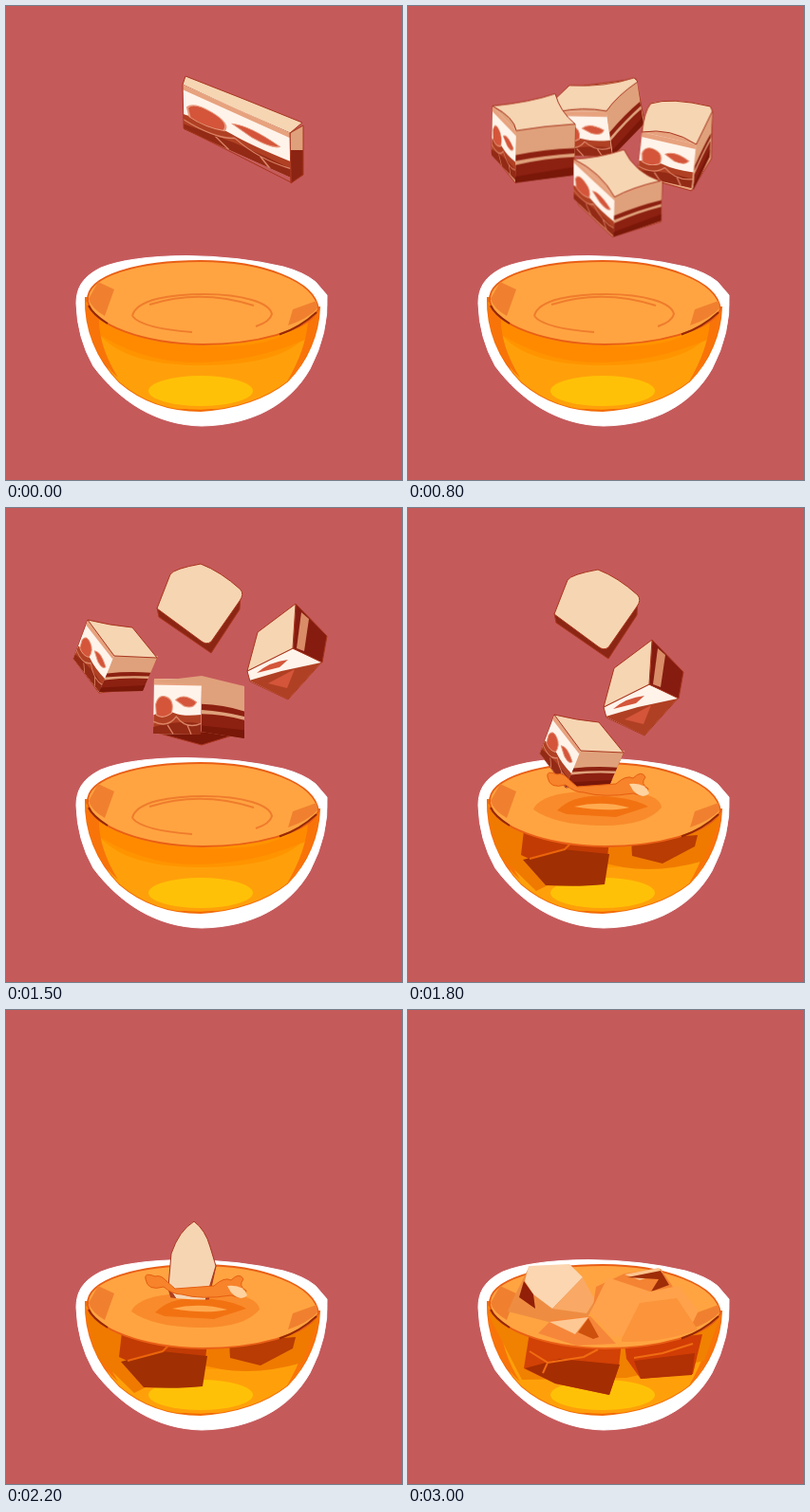
An HTML page without scripts for the animation above (3100 ms loop, 417x500 px).

```html
<!DOCTYPE html>
<html lang="en">
<head>
<meta charset="utf-8">
<title>Pork cubes and broth</title>
<style>
html, body { margin: 0; width: 100%; height: 100%; overflow: hidden; background: #c55a5b }
svg { display: block; width: 100%; height: 100% }

/* One 3.1 s loop, held in 100 ms poses */
[class] { animation: 3.1s step-end infinite }
.slab { animation-name: slab }
.block { animation-name: block }
.grow-top { animation-name: grow-top }
.grow-side { animation-name: grow-side }
.half-l { animation-name: half-l }
.half-r { animation-name: half-r }
.cut-a { animation-name: cut-a }
.cut-b { animation-name: cut-b }
.cut-c { animation-name: cut-c }
.cut-d { animation-name: cut-d }
.toss-e { animation-name: toss-e }
.toss-f { animation-name: toss-f }
.toss-g { animation-name: toss-g }
.toss-h { animation-name: toss-h }
.dive-j { animation-name: dive-j }
.dive-k { animation-name: dive-k }
.calm { animation-name: calm }
.busy { animation-name: busy }
.splash { animation-name: splash }
.ripple { animation-name: ripple }
.column { animation-name: column; transform-origin: 203px 318px }
.drop { animation-name: drop }
.served { animation-name: served }
.float { animation-name: float }

@keyframes slab {
  0% { translate: 0 0 } 3.22% { translate: -30px 9px } 6.45% { translate: -60px 17px } 9.67%, 100% { translate: -90px 26px }
}
@keyframes block { 0% { opacity: 1 } 12.9%, 100% { opacity: 0 } }
@keyframes grow-top {
  0% { d: path("M189 74L250 98L312 123L299 134L240 108L186 83Z"); animation-timing-function: steps(3) }
  9.67%, 100% { d: path("M189 74L250 98L312 123L209 160L150 134L96 109Z") }
}
@keyframes grow-side {
  0% { d: path("M299 134L313 126L313 178L300 187Z"); animation-timing-function: steps(3) }
  9.67%, 100% { d: path("M209 160L313 126L313 178L210 213Z") }
}
@keyframes half-l {
  0% { opacity: 0 } 12.9% { opacity: 1; translate: 4px 0 } 16.12% { opacity: 1; translate: 0 0 }
  19.35% { opacity: 1; translate: -2px 0 } 22.58%, 100% { opacity: 0 }
}
@keyframes half-r {
  0% { opacity: 0 } 12.9% { opacity: 1; translate: -4px -4px } 16.12% { opacity: 1; translate: 0 0 }
  19.35% { opacity: 1; translate: 3px 2px } 22.58%, 100% { opacity: 0 }
}
@keyframes cut-a {
  0% { opacity: 0 } 22.58% { opacity: 1; translate: 8px -2px; animation-timing-function: steps(4) }
  35.48% { opacity: 1; translate: 0 0 } 38.7%, 100% { opacity: 0 }
}
@keyframes cut-b {
  0% { opacity: 0 } 22.58% { opacity: 1; translate: 0 13px; animation-timing-function: steps(4) }
  35.48% { opacity: 1; translate: 0 0 } 38.7%, 100% { opacity: 0 }
}
@keyframes cut-c {
  0% { opacity: 0 } 22.58% { opacity: 1; translate: -22px 8px; animation-timing-function: steps(4) }
  35.48% { opacity: 1; translate: 0 0 } 38.7%, 100% { opacity: 0 }
}
@keyframes cut-d {
  0% { opacity: 0 } 22.58% { opacity: 1; translate: 10px -10px; animation-timing-function: steps(4) }
  35.48% { opacity: 1; translate: 0 0 } 38.7%, 100% { opacity: 0 }
}
@keyframes toss-e {
  0% { opacity: 0 } 38.7% { opacity: 1; translate: 0 -15px } 41.93% { opacity: 1; translate: 0 -22px }
  45.16% { opacity: 1; translate: 0 -13px } 48.38% { opacity: 1; translate: 0 0 } 51.61% { opacity: 1; translate: -1px 1px }
  54.83% { opacity: 1; translate: -3px 3px } 58.06% { opacity: 1; translate: -5px 6px } 61.29%, 100% { opacity: 0 }
}
@keyframes toss-f {
  0% { opacity: 0 } 38.7% { opacity: 1; translate: -1px -12px } 41.93% { opacity: 1; translate: -2px -16px }
  45.16% { opacity: 1; translate: -2px -10px } 48.38% { opacity: 1; translate: 0 0 } 51.61% { opacity: 1; translate: 18px 12px }
  54.83% { opacity: 1; translate: 42px 45px } 58.06% { opacity: 1; translate: 68px 100px } 61.29%, 100% { opacity: 0 }
}
@keyframes toss-g {
  0% { opacity: 0 } 38.7% { opacity: 1; translate: 0 -12px } 41.93% { opacity: 1; translate: 0 -16px }
  45.16% { opacity: 1; translate: 0 -8px } 48.38% { opacity: 1; translate: 0 0 } 51.61% { opacity: 1; translate: -10px 5px }
  54.83% { opacity: 1; translate: -24px 18px } 58.06% { opacity: 1; translate: -48px 38px } 61.29%, 100% { opacity: 0 }
}
@keyframes toss-h {
  0% { opacity: 0 } 38.7% { opacity: 1; translate: 2px -14px } 41.93% { opacity: 1; translate: 0 -18px }
  45.16% { opacity: 1; translate: 0 -11px } 48.38% { opacity: 1; translate: 0 0 } 51.61% { opacity: 1; translate: 0 25px }
  54.83% { opacity: 1; translate: 0 75px } 58.06%, 100% { opacity: 0 }
}
@keyframes dive-j {
  0% { opacity: 0 } 61.29% { opacity: 1; translate: 0 -30px } 64.51% { opacity: 1; translate: 0 0 }
  67.74% { opacity: 1; translate: 1px 45px } 70.96% { opacity: 1; translate: 2px 110px } 74.19%, 100% { opacity: 0 }
}
@keyframes dive-k {
  0% { opacity: 0 } 61.29% { opacity: 1; translate: 12px -45px } 64.51% { opacity: 1; translate: 0 0 }
  67.74% { opacity: 1; translate: 0 50px } 70.96%, 100% { opacity: 0 }
}
@keyframes calm { 0% { opacity: 1 } 54.83%, 100% { opacity: 0 } }
@keyframes busy { 0% { opacity: 0 } 58.06% { opacity: 1 } 77.41%, 100% { opacity: 0 } }
@keyframes splash { 0% { opacity: 0 } 54.83% { opacity: 1 } 77.41%, 100% { opacity: 0 } }
@keyframes ripple { 0% { opacity: 0 } 77.41% { opacity: 1 } 90.32%, 100% { opacity: 0 } }
@keyframes column {
  0% { opacity: 0 } 77.41% { opacity: 1; scale: 1 .75 } 80.64% { opacity: 1; scale: 1 1 }
  83.87% { opacity: 1; scale: 1 .7 } 87.09% { opacity: 1; scale: 1 .25 } 90.32%, 100% { opacity: 0 }
}
@keyframes drop {
  0% { opacity: 0 } 80.64% { opacity: 1; translate: 0 0 } 83.87% { opacity: 1; translate: 0 35px }
  87.09% { opacity: 1; translate: 0 95px } 90.32%, 100% { opacity: 0 }
}
@keyframes served { 0% { opacity: 0 } 90.32%, 100% { opacity: 1 } }
@keyframes float { 0% { translate: 0 8px } 93.54% { translate: 0 3px } 96.77%, 100% { translate: 0 0 } }
</style>
</head>
<body>
<svg viewBox="0 0 417 500" preserveAspectRatio="none">
<defs>
  <!-- Meat faces on a 100 unit square, placed by matrix -->
  <g id="cut">
    <path fill="#fff3ea" d="M0 0H100V100H0Z"/>
    <path fill="#e7a27e" d="M0 0H100V11H0Z"/>
    <path fill="#b04023" d="M0 66Q28 56 45 62T100 64V100H0Z"/>
    <path fill="#932a15" d="M0 88Q50 74 100 80V100H0Z"/>
    <path fill="#d4553a" stroke="#e99a7e" stroke-width="2" d="M4 47Q10 27 27 33T38 62Q20 74 6 66ZM46 38Q62 24 90 41Q84 54 64 49Z"/>
    <path fill="none" stroke="#dc8467" stroke-width="2.5" d="M0 78Q30 90 48 68Q70 92 100 80M30 84L42 100M72 84L80 100"/>
  </g>
  <g id="side">
    <path fill="#dfa17b" d="M0 0H100V100H0Z"/>
    <path fill="#8c2011" d="M0 47Q50 42 100 48V58Q50 54 0 58ZM0 66Q50 60 100 65V100H0Z"/>
    <path fill="#791709" d="M0 88L100 84V100H0Z"/>
  </g>
  <linearGradient id="end" x2="0" y2="1">
    <stop offset=".42" stop-color="#dfa17b"/><stop offset=".42" stop-color="#8c2413"/>
  </linearGradient>
  <path id="body" d="M84 308C83 340 95 372 120 397Q155 427 205 427Q262 423 296 396C318 374 329 345 330 318Z"/>
  <clipPath id="in-bowl"><use href="#body"/></clipPath>
  <clipPath id="surface"><path d="M0 0H417V296Q300 300 260 302Q205 310 150 300L0 296Z"/></clipPath>
</defs>
<rect width="417" height="500" fill="#c55a5b"/>

<!-- Bowl -->
<path fill="#fff" stroke="#fff" d="M74 314C74 296 82 285 100 276Q130 264 190 263.5Q245 264 292 275Q314 281 326 291L338 305Q340 345 320 383C299 420 260 442 206 443C157 442 119 416 92 380Q75 350 74 314Z"/>
<use href="#body" fill="#ff9400" stroke="#f26b05" stroke-width="2"/>
<g clip-path="url(#in-bowl)">
  <path fill="#ffa00a" d="M97 345Q125 380 210 379T318 345L300 425H120Z"/>
  <path fill="#ff8a00" d="M84 312Q120 350 205 358T330 320L320 350Q260 376 200 376T88 340Z"/>
  <path fill="#f97408" d="M82 312L98 328Q97 358 118 392Q86 365 82 312ZM331 318L318 332Q316 362 296 396Q328 365 331 318Z"/>
  <ellipse cx="205" cy="406" rx="55" ry="16" fill="#ffc107"/>
  <g class="busy">
    <path fill="#f07a00" d="M84 320L330 322L312 372Q250 390 200 372L135 404L95 365Z"/>
    <path fill="#c23b04" d="M122 340L212 350L209 378L190 368L132 372L119 366Z"/>
    <path fill="#a02f03" d="M121 371L163 360L212 365L207 397Q180 400 145 398Z"/>
    <path fill="#b83c03" d="M235 350L305 345L302 357L268 375L236 367Z"/>
    <path fill="none" stroke="#ec650b" stroke-width="2" d="M128 370L165 360L171 354"/>
  </g>
  <g class="ripple">
    <path fill="#f87c00" d="M84 320H330L310 375Q260 390 232 378L140 398L95 365Z"/>
    <path fill="#d94505" d="M132 345L230 350L229 392Q207 414 184 415Q150 409 135 391Z"/>
    <path fill="#b02c04" d="M133 376Q158 375 177 392L229 376V392Q207 414 184 415Q150 409 135 391Z"/>
    <path fill="none" stroke="#f06c18" stroke-width="2" d="M133 366Q157 389 179 378L228 382M183 360V378"/>
    <path fill="#dc4806" d="M232 354L318 342L308 363L290 379L262 378Z"/>
    <path fill="#b32b04" d="M241 362L311 360L290 379L262 378Z"/>
  </g>
  <g class="served">
    <path fill="#f18100" d="M84 320H330L312 370L230 388L120 390Z"/>
    <path fill="#d24105" d="M128 340L225 350L222 376L212 406L155 394L122 378Z"/>
    <path fill="#a52d02" d="M123 378L160 368L223 374L212 406L155 394Z"/>
    <path fill="#d13d05" d="M228 352L310 342L300 384L245 389L230 368Z"/>
    <path fill="#b13004" d="M238 370L302 362L299 385L245 389Z"/>
    <path fill="none" stroke="#f06c12" stroke-width="2" d="M128 360L147 372L142 383M147 372L185 366L200 358M238 367L268 362L300 352"/>
  </g>
</g>
<path fill="#ffa441" stroke="#e95f16" stroke-width="1.8" d="M86 311C84 284 140 269 205 269C270 269 326 290 329 320C318 343 262 357 207 357C145 356 91 337 86 311Z"/>
<path fill="#f0802f" d="M87 309L97 291L114 299L104 327Q90 319 87 309ZM327 311L302 320L297 337Q318 330 328 319Z"/>
<path fill="none" stroke="#952806" stroke-width="2" d="M87 316Q91 325 107 335M288 346.500Q310 339 327 323"/>

<g class="calm" fill="none" stroke="#ef7c2d" stroke-width="2">
  <path d="M133 327C137 309 175 304 209 304C249 304 278 313 280 325Q278 333 263 338M133 327Q143 340 196 344M151 315Q205 298 261 316"/>
</g>
<g class="ripple">
  <path fill="#f5892d" d="M91 312Q100 286 160 275L200 272L260 281Q310 292 327 318Q284 341 203 343Q130 340 91 312Z"/>
  <path fill="#fdbc78" d="M108 309Q122 290 160 296L128 312ZM236 290Q290 294 312 322L296 325Q287 306 236 290Z"/>
  <ellipse cx="199" cy="319" rx="66" ry="24" fill="#ffa143" stroke="#ec741b" stroke-width="2"/>
  <ellipse cx="201" cy="317" rx="52" ry="18" fill="#f98a25"/>
  <path fill="#f47716" d="M167 321Q184 313 188 298H216Q222 313 239 320Q204 341 167 321Z"/>
</g>
<g class="column">
  <path fill="#f4750b" stroke="#d54506" stroke-width="1.6" d="M190 203Q191 194 199 194T208 203Q209 218 205 231Q211 248 212 263Q211 285 217 302Q203 308 186 302Q192 281 189 263Q194 242 192 228Z"/>
  <path fill="#ffab44" d="M197 200Q203 193 204 207L200 219ZM193 257L203 259L201 270ZM193 292L205 288L202 298Z"/>
  <path fill="#de5306" d="M193 211L200 221L202 244L194 250ZM204 269L211 264L214 298L204 291Z"/>
</g>
<g class="drop">
  <path fill="#ee650a" stroke="#c8390a" stroke-width="1.6" d="M188 168Q189 159 199 159T210 168V176Q207 184 199 184T189 177Z"/>
  <path fill="#bc2f0b" d="M190 167Q192 161 199 161T209 169Q199 174 190 167Z"/>
  <path fill="#fff0d2" d="M196 163L206 164L205 169Z"/>
</g>
<g class="served">
  <g class="float">
    <path fill="#ee8d42" d="M113 300L128 270L184 283L197 310L188 326L152 330L105 318Z"/>
    <path fill="#fbd6b1" d="M127 270L170 268L184 282L152 315L132 300L123 286Z"/>
    <path fill="#f9a965" d="M184 282L197 306L188 320L152 315Z"/>
    <path fill="#921f07" d="M122 286L132 300L134 315L117 303Z"/>
    <path fill="#f48333" d="M198 292L228 278L266 273L277 289L285 303L242 318L194 318Z"/>
    <path fill="#fdc48e" d="M228 279L264 272L268 277L244 285Z"/>
    <path fill="#9e2d08" d="M231 282L266 275L275 290L256 297L264 284Z"/>
    <path fill="#ffa24b" d="M210 282L255 297L285 291L306 317L295 340L215 345L192 319Z"/>
    <path fill="#fb943a" d="M225 347L244 309L283 304L305 337Q270 351 225 350Z"/>
    <path fill="#f6873a" d="M137 341L151 327L192 323L219 352L177 354Z"/>
    <path fill="#fdc894" d="M149 329L190 324L176 342Z"/>
    <path fill="#cd500d" d="M190 325L201 345L195 347L179 340Z"/>
  </g>
</g>
<g class="splash">
  <path fill="#f98b2c" d="M132 318Q139 299 202 298T267 316Q250 336 202 335T132 318Z"/>
  <path fill="#f27212" d="M157 319Q174 302 206 304T253 315L219 326L167 323Z"/>
  <path fill="#ffaa50" d="M175 315Q204 308 233 316Q211 321 175 315Z"/>
</g>

<!-- Falling cubes, hidden below the surface -->
<g clip-path="url(#surface)" stroke="#a8361e" stroke-linejoin="round">
  <g class="dive-j">
    <path fill="#ad401f" d="M168 181L174 200L188 219L209 205L219 160Z"/>
    <path fill="#f6d5b3" d="M196 113Q208 122 213 140L219 160L207 200L190 215L169 182L172 147Q180 123 196 113Z"/>
  </g>
  <g class="dive-k">
    <path fill="#8c2513" d="M211 208L247 240L249 260L235 291L219 263Z"/>
    <path fill="#d8845c" stroke="none" d="M216 212L229 223L238 278L232 286L222 263Z"/>
    <path fill="#f6d5b3" d="M167 281Q169 253 176 239L211 208L219 263Z"/>
    <use href="#cut" transform="matrix(.52 -.18 .14 .27 167 281)" stroke="none"/>
  </g>
  <g class="toss-e">
    <path fill="#8c2614" d="M159 105L214 143L247 91L246 107L216 153L161 115Z"/>
    <path fill="#f6d5b3" d="M159 106L173 70Q177 64 205 59Q226 67 247 86Q251 91 246 98L216 141Q211 145 205 140Z"/>
  </g>
  <g class="toss-f">
    <path fill="#dfa17b" d="M86 118L71 159L98 195L144 190L159 158Z"/>
    <use href="#cut" transform="matrix(.28 .36 -.15 .4 86 119)" stroke="none"/>
    <use href="#side" transform="matrix(.46 -.01 -.16 .37 114 157)" stroke="none"/>
    <path fill="#f6d5b3" d="M86 118Q110 124 133 126L159 158L114 156Z"/>
  </g>
  <g class="toss-g">
    <path fill="#fff3ea" d="M254 172L302 148L333 162L297 202L257 183Z"/>
    <path fill="#b04023" stroke="none" d="M256 182L290 172L332 163L297 202Z"/>
    <path fill="#d4553a" stroke="none" d="M264 174Q278 162 297 160L288 168ZM276 185L304 170L296 190Z"/>
    <path fill="#861c10" d="M305 101L338 135L333 163L302 148Z"/>
    <path fill="#d98c67" stroke="none" d="M311 110L319 117L314 151L306 148Z"/>
    <path fill="#f6d5b3" d="M254 172L265 131L305 101L302 148Z"/>
  </g>
  <g class="toss-h">
    <path fill="#791709" d="M155 236L251 236L206 250Z"/>
    <use href="#cut" transform="matrix(.5 .01 -.01 .58 156 180)" stroke="none"/>
    <use href="#side" transform="matrix(.45 .07 0 .55 206 181)" stroke="none"/>
    <path fill="#dfa17b" stroke="none" d="M156 183L206 177L251 188L206 187Z"/>
  </g>
</g>
<g class="splash">
  <path fill="#f7832b" stroke="#e45e12" d="M147 284Q145 276 157 281Q163 279 169 286L178 294L219 291Q230 281 237 285Q246 276 250 284Q244 291 253 296Q253 307 237 301Q206 306 185 300Q175 300 166 292Q149 297 147 284Z"/>
  <path fill="#ffd3a0" d="M233 291Q250 289 254 301Q247 308 237 298Z"/>
</g>

<!-- Slab, halves and the four cut cubes -->
<g stroke="#a8361e" stroke-linejoin="round">
  <g class="block">
    <path class="grow-side" fill="url(#end)"/>
    <path class="grow-top" fill="#f6d5b3"/>
    <g class="slab">
      <use href="#cut" transform="matrix(1.13 .51 .01 .47 186 83)" stroke="none"/>
      <path fill="none" d="M186 83L187 129L235 153L300 186L299 134"/>
    </g>
  </g>
  <g class="half-l">
    <path fill="#dfa17b" d="M133 134L206 122L194 142L190 175Q160 172 135 184Z"/>
    <path fill="#861c10" stroke="none" d="M135 155Q160 147 192 149V154Q160 153 135 162ZM135 167Q160 158 191 158L190 175Q160 172 135 184Z"/>
    <use href="#cut" transform="matrix(.43 .27 0 .45 92 109)" stroke="none"/>
    <path fill="#f6d5b3" d="M92 109Q104 101 122 94Q158 95 178 90L199 84Q212 82 222 86L250 98L248 104Q226 111 210 121Q170 127 135 136Q112 125 92 109Z"/>
  </g>
  <g class="half-r">
    <path fill="#dfa17b" d="M250 180L262 148L306 123V173Q270 184 262 196Q258 212 250 240Z"/>
    <path fill="#861c10" stroke="none" d="M251 203Q262 174 306 150V156Q266 176 251 211ZM251 218Q262 182 306 161V173Q270 184 262 196Q258 212 250 240Z"/>
    <path fill="#932a15" d="M187 208L252 222L250 240Q215 228 187 208Z"/>
    <use href="#cut" transform="matrix(.64 .17 .02 .47 186 163)" stroke="none"/>
    <path fill="#f6d5b3" d="M186 164L204 139Q225 126 246 104Q269 105 305 123Q287 136 268 145Q254 153 258 164L251 181Z"/>
  </g>
  <g class="cut-b">
    <path fill="#dfa17b" d="M149 95L172 76L240 67L249 112L214 150L168 134Z"/>
    <use href="#cut" transform="matrix(.52 .01 .06 .47 157 101)" stroke="none"/>
    <use href="#side" transform="matrix(.32 -.33 .07 .46 209 102)" stroke="none"/>
    <path fill="#f6d5b3" d="M149 94L170 74Q208 76 238 66L242 70Q220 85 209 101Q184 96 157 102Z"/>
  </g>
  <g class="cut-a">
    <path fill="#dfa17b" d="M83 107L82 157L107 188L169 178L170 126L108 122Z"/>
    <use href="#cut" transform="matrix(.25 .26 -.01 .52 83 107)" stroke="none"/>
    <use href="#side" transform="matrix(.62 -.08 -.01 .55 108 133)" stroke="none"/>
    <path fill="#f6d5b3" d="M83 107Q123 103 149 94Q154 113 170 126Q137 128 108 133Q106 119 83 107Z"/>
  </g>
  <g class="cut-c">
    <path fill="#e7a27e" d="M263 127L258 173L315 189L336 155L337 105L300 120Z"/>
    <use href="#cut" transform="matrix(.57 .13 -.05 .46 263 127)" stroke="none"/>
    <use href="#side" transform="matrix(.17 -.35 -.03 .48 320 140)" stroke="none"/>
    <path fill="#f6d5b3" d="M263 127Q265 106 272 97Q293 90 335 100L337 105L320 140Q293 122 263 127Z"/>
  </g>
  <g class="cut-d">
    <path fill="#e7a27e" d="M167 169Q165 200 172 217L208 251L259 235L260 192L200 183Z"/>
    <use href="#cut" transform="matrix(.43 .4 0 .43 167 168)" stroke="none"/>
    <use href="#side" transform="matrix(.5 -.17 -.01 .42 210 209)" stroke="none"/>
    <path fill="#f6d5b3" d="M167 169Q193 168 220 159Q231 183 258 192Q228 199 210 209Q196 183 167 169Z"/>
  </g>
</g>
</svg>
</body>
</html>
```
